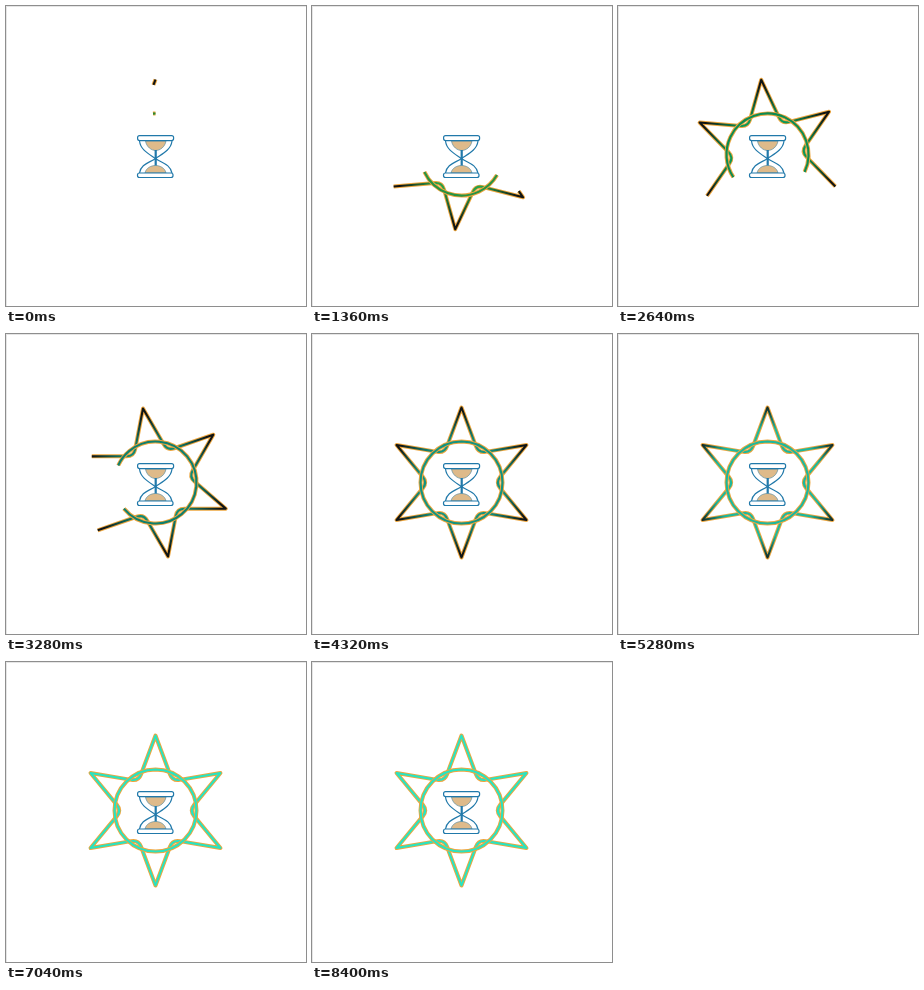
An HTML page that plays this animation: 300 by 300 pixels, repeating every 10 s.

```html
<!DOCTYPE html>
<html lang="en">
<head>
<meta charset="utf-8">
<title>Hourglass</title>
<style>
html, body { margin: 0; width: 100%; height: 100%; overflow: hidden; background: #fff; }
svg { display: block; width: 100vw; height: 100vh; }
.line { fill: none; stroke-linejoin: round; }
.edge { stroke: #eda63f; stroke-width: 4; }
.core { stroke: url(#glow); stroke-width: 2.1; }
.glass { fill: none; stroke: #2179aa; stroke-width: 1.2; }
.sand { fill: #deba8a; stroke: #5f8ea0; stroke-width: .7; }
</style>
</head>
<body>
<svg viewBox="0 0 300 300">
  <defs>
    <radialGradient id="glow" gradientUnits="userSpaceOnUse" cx="0" cy="0" r="110">
      <stop id="inner"/>
      <stop id="outer" stop-color="#101414"/>
    </radialGradient>
  </defs>
  <path d="M0 .5H300M.5 0V300" stroke="#e6e6e6"/>
  <g class="glass">
    <path class="sand" d="M139.5 135H160C159 141 154 144.500 149.700 144.500S140.500 141 139.500 135Z"/>
    <path class="sand" d="M139 167C140 162 145 159.500 149.500 159.500S159 162 160 167Z"/>
    <path d="M133.500 135C134.500 144 143 148 149.500 152.500S164 158 166 167"/>
    <path d="M166 135C165 144 156 148 149.500 152.500S135 158 133.500 167"/>
    <path d="M149.700 144V159.500" stroke-width="2.2"/>
    <rect x="131.600" y="129.600" width="36" height="5" rx="2" fill="#fff"/>
    <rect x="131.500" y="167" width="35.500" height="4.500" rx="2" fill="#fff"/>
  </g>
  <g id="spin"></g>
</svg>
<script>
const LOOP = 10000, STEP = 80, DRAW = 4000, GLOW_END = 7120;
const CENTER = "149.5 148.5", TIP = 75, VALLEY = 34, RING = 41;
const $ = id => document.getElementById(id);
const mix = (a, b, k) => a + (b - a) * k;
const clamp = v => Math.min(1, Math.max(0, v));

const polar = (r, deg) => {
  const a = deg * Math.PI / 180;
  return [r * Math.sin(a), -r * Math.cos(a)];
};
const along = (a, b, k) => a.map((v, i) => mix(v, b[i], k));
const fmt = p => p.map(v => v.toFixed(2)).join(" ");

function starPath() {
  let d = "M" + fmt(polar(TIP, 0));
  for (let a = 0; a < 360; a += 60) {
    const from = polar(TIP, a), dip = polar(VALLEY, a + 30), to = polar(TIP, a + 60);
    d += `L${fmt(along(from, dip, .85))}Q${fmt(dip)} ${fmt(along(to, dip, .85))}L${fmt(to)}`;
  }
  return d + "Z";
}
const ringPath = `M0 ${-RING}A${RING} ${RING} 0 0 1 0 ${RING}A${RING} ${RING} 0 0 1 0 ${-RING}Z`;

const lines = [];
for (const d of [starPath(), ringPath]) {
  for (const kind of ["edge", "core"]) {
    const p = document.createElementNS("http://www.w3.org/2000/svg", "path");
    p.setAttribute("class", "line " + kind);
    p.setAttribute("d", d);
    p.setAttribute("pathLength", 1);
    $("spin").append(p);
    lines.push(p);
  }
}

// time, then r g b of the inner colour
const tints = [
  [0, 44, 150, 52], [1360, 40, 160, 72], [2640, 12, 152, 88],
  [3280, 14, 138, 118], [4240, 18, 144, 126], [6160, 36, 218, 184], [GLOW_END, 40, 228, 194]
];
function tintAt(t) {
  const i = tints.findIndex(s => s[0] > t);
  const b = i < 0 ? tints[tints.length - 1] : tints[i];
  const a = i < 0 ? b : tints[i - 1];
  const k = a === b ? 0 : (t - a[0]) / (b[0] - a[0]);
  return `rgb(${along(a, b, k).slice(1).map(Math.round)})`;
}

function render(t) {
  const p = clamp(t / DRAW), shown = mix(.01, 1, p);
  $("spin").setAttribute("transform", `translate(${CENTER}) rotate(${720 * p})`);
  for (const line of lines) {
    line.style.strokeDasharray = p < 1 ? "1 2" : "none";
    line.style.strokeDashoffset = shown - 1;
  }
  const g = clamp((t - DRAW) / (GLOW_END - DRAW));
  $("inner").setAttribute("stop-color", tintAt(t));
  $("inner").setAttribute("offset", mix(38, 76, g) / 110);
  $("outer").setAttribute("offset", mix(69, 92, g) / 110);
}

const start = performance.now();
function tick() {
  const t = (performance.now() - start) % LOOP;
  render(Math.floor(t / STEP) * STEP);
  requestAnimationFrame(tick);
}
render(0);
requestAnimationFrame(tick);
</script>
</body>
</html>
```
